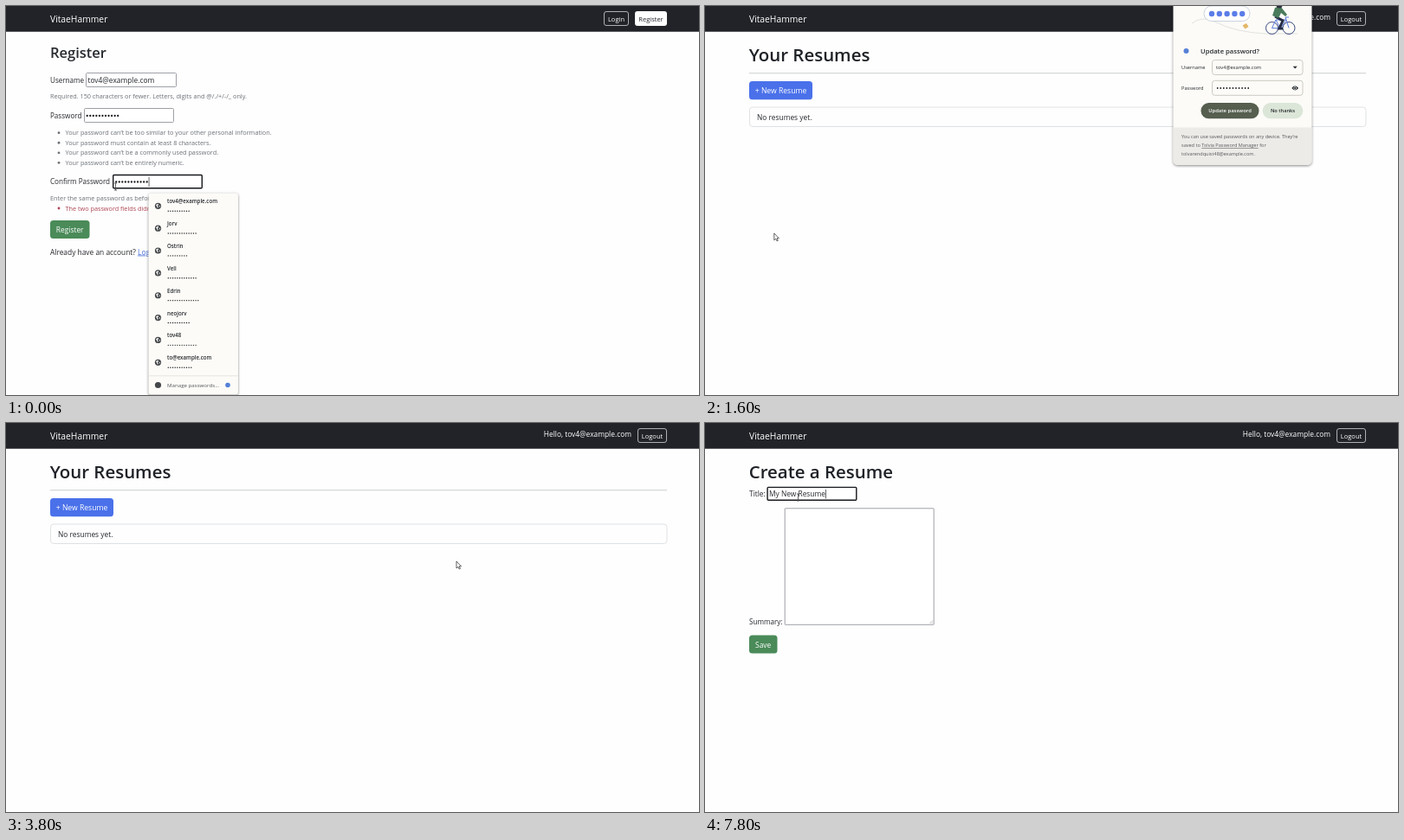
Recreate the animation shown at these times as an HTML page. Size 800 px wide and 450 px high, loop 8 s.

```html
<!DOCTYPE html>
<html lang="en">
<head>
<meta charset="utf-8">
<title>Resume builder</title>
<style>
html, body { margin: 0; width: 100%; height: 100%; overflow: hidden; background: #fefefe; }
svg { display: block; width: 800px; height: 450px; font: 8.39px "Open Sans", "Noto Sans", sans-serif; fill: #26292e; }
.h1 { font-size: 20.45px; font-weight: 600; fill: #1f2227; }
.brand { font-size: 10.3px; }
.label { font-size: 8.1px; }
.help { font-size: 7.28px; fill: #6b7077; }
.btn { font-size: 7.5px; }
.tiny { font-size: 5.7px; }
.bold { font-weight: 600; }
.light { fill: #fff; }
.mid { text-anchor: middle; }
.end { text-anchor: end; }
.error { fill: #ae4452; }
.link { fill: #4a6fd8; text-decoration: underline; }
.field { fill: #fff; stroke: #94969e; stroke-width: .9; }
.focus { stroke: #16181c; stroke-width: 1.4; }
.outline { fill: none; stroke: #d4d4d6; stroke-width: .8; }
.green { fill: #4a8b59; }
.green.hover { fill: #42734e; }
.blue { fill: #4a71ea; }
.blue.hover { fill: #3d60cb; }
.dots { fill: none; stroke: #1c1e22; stroke-linecap: round; stroke-width: 2.3; stroke-dasharray: 0 3.55; }
.panel { fill: #fcfbf7; filter: drop-shadow(0 1px 1.5px #0007); }
.box { fill: #fcfbf7; stroke: #cbcbc3; }
</style>
</head>
<body>
<svg viewBox="0 0 800 450">
  <defs>
    <g id="globe">
      <circle r="3.6" fill="#45484b"/>
      <path d="M-2.6-1.2 0-2.6.8-1.4-.6-.2.4 1-.6 2.6-1.2.8ZM1.4-.6 2.8 0 1.8 1.8Z" fill="#eee"/>
    </g>
  </defs>

  <path d="M0 0H800V29.7H0Z" fill="#212328"/>
  <text class="brand light" x="51" y="18.5">VitaeHammer</text>

  <g id="register">
    <rect class="outline" x="690.5" y="6.5" width="28" height="16" rx="2.5"/>
    <text class="btn light mid" x="704.5" y="17.6">Login</text>
    <rect class="light" x="726" y="6" width="37" height="17" rx="3"/>
    <text class="btn mid" x="744.5" y="17.6">Register</text>

    <text class="bold" font-size="16.5" x="51" y="60">Register</text>
    <text class="label" x="51" y="89">Username</text>
    <rect class="field" x="92.5" y="77.5" width="104" height="16" rx="1"/>
    <text x="94.5" y="89">tov4@example.com</text>
    <text class="help" x="51" y="107.3">Required. 150 characters or fewer. Letters, digits and @/./+/-/_ only.</text>
    <text class="label" x="51" y="130">Password</text>
    <rect class="field" x="90.5" y="118.5" width="103" height="16" rx="1"/>
    <path class="dots" d="M93.7 127h36"/>
    <g id="rules" class="help"></g>
    <text class="label" x="51" y="206.3">Confirm Password</text>
    <rect id="confirm" class="field" x="123.7" y="195.5" width="102.6" height="15.2" rx="1"/>
    <path class="dots" d="M127.2 203.5h36"/>
    <path id="confirmCaret" d="M164.7 198h.7v11h-.7Z"/>
    <text class="help" x="51" y="225">Enter the same password as before, for verification.</text>
    <g class="help error">
      <circle cx="61" cy="234" r="1.4"/>
      <text class="error" x="68.5" y="236.6">The two password fields didn’t match.</text>
    </g>
    <rect id="submit" class="green" x="51" y="248" width="45.5" height="21" rx="3.5"/>
    <text class="light mid" x="73.7" y="262">Register</text>
    <text x="51" y="287.5">Already have an account? <tspan class="link">Login here</tspan>.</text>
  </g>

  <g id="saved">
    <rect class="panel" x="164.5" y="216.5" width="103.5" height="233" rx="3"/>
    <g id="logins" font-size="6.15"></g>
    <path d="M164.5 427.5H268V428.3H164.5Z" fill="#dddcd6"/>
    <circle cx="175.5" cy="438.5" r="3.6" fill="#45484b"/>
    <text font-size="6.15" x="186" y="441" fill="#55585c">Manage passwords...</text>
    <circle cx="256" cy="438.5" r="2.8" fill="#5580d8"/>
  </g>

  <g id="account">
    <text class="light end" x="722" y="16.4">Hello, tov4@example.com</text>
    <rect class="outline" x="729.5" y="6.5" width="33" height="16" rx="2.5"/>
    <text class="btn light mid" x="746" y="17.5">Logout</text>
  </g>

  <g id="resumes">
    <text class="h1" x="50.7" y="64.3">Your Resumes</text>
    <path d="M51 77.2H763V78.2H51Z" fill="#cbccce"/>
    <rect id="add" class="blue" x="51" y="87" width="73" height="21.3" rx="3.5"/>
    <text class="light mid" x="87.5" y="101.2" font-size="8.6">+ New Resume</text>
    <rect x="51.5" y="117" width="711.5" height="22.5" rx="3.5" fill="none" stroke="#dfe2e6"/>
    <text x="60" y="131.6">No resumes yet.</text>
  </g>

  <g id="create">
    <text class="h1" x="50.7" y="64.3">Create a Resume</text>
    <text x="51" y="85.3">Title:</text>
    <rect id="title" class="field" x="72.1" y="74.4" width="102.7" height="14.9" rx="1"/>
    <text id="typed" x="74" y="85.3"></text>
    <path id="titleCaret" d="M0 77h.7v10.5h-.7Z"/>
    <text class="label" x="51" y="233.3">Summary:</text>
    <rect class="field" x="92.2" y="98.8" width="172" height="134.5" rx=".5"/>
    <path d="M259.5 232 263 228.5M261.7 232 263 230.7" stroke="#999" stroke-width=".6"/>
    <rect class="green" x="51" y="245.5" width="32.5" height="21" rx="3.5"/>
    <text class="light mid" x="67.2" y="259.6">Save</text>
  </g>

  <g id="popup">
    <rect class="panel" x="540.5" y="-20" width="160" height="204" rx="5"/>
    <path d="M540.5 140.5h160V179a5 5 0 0 1-5 5h-150a5 5 0 0 1-5-5Z" fill="#edebe8"/>
    <path d="M562 20Q574 11 588 18T616 28T646 32H684" fill="none" stroke="#d5d7d8" stroke-width=".7"/>
    <rect x="576" y="0" width="53" height="17.5" rx="8.7" fill="#fff" stroke="#cbd3df"/>
    <path d="M585 9h36" fill="none" stroke="#5b7de8" stroke-width="6.4" stroke-linecap="round" stroke-dasharray="0 8.8"/>
    <path d="M620.5 22.5 625 20 627.5 24 623.5 26.5Z" fill="#e3b668"/>
    <g fill="none" stroke="#39487e">
      <circle cx="654.5" cy="25.5" r="7"/>
      <circle cx="674" cy="25.5" r="7"/>
      <path d="M654.5 25.5 659 16H671L664 26ZM659 16 664 26M674 25.5 670 13H674" stroke="#587bdc"/>
      <path d="M658 12 667 17 663 26H667" stroke="#252c46" stroke-width="3"/>
    </g>
    <path d="M655 11 658 2 664 0 668 5 672 10 670 12 665 8 662 14Z" fill="#4a7b5b"/>
    <circle cx="663" cy="-1" r="3.5" fill="#2b2f3e"/>
    <circle cx="555.5" cy="52" r="3" fill="#5580d8"/>
    <text class="bold" font-size="7.65" x="572" y="54.8">Update password?</text>
    <g class="tiny">
      <text x="550" y="73">Username</text>
      <rect class="box" x="585.5" y="62.5" width="104.5" height="17" rx="3"/>
      <text x="590" y="73">tov4@example.com</text>
      <path d="M678.7 69.8h5l-2.5 2.6Z"/>
      <text x="550" y="97">Password</text>
      <rect class="box" x="585.5" y="86.3" width="104.5" height="17" rx="3"/>
      <path class="dots" d="M591.7 95h36" style="stroke-width:1.8"/>
      <path d="M677.3 95q3.9-4.8 7.8 0q-3.9 4.8-7.8 0Z"/>
      <circle cx="681.2" cy="95" r="1.5" fill="none" stroke="#fff" stroke-width=".7"/>
      <rect id="ring" x="571.3" y="110.8" width="69.4" height="20.7" rx="10.3" fill="none" stroke="#4c5546" stroke-width="1.3"/>
      <rect id="update" x="572.5" y="112" width="67" height="18.3" rx="9.1" fill="#555e4f"/>
      <text class="bold light mid" font-size="5.9" x="606" y="123.4">Update password</text>
      <rect x="643.7" y="112" width="46.5" height="18.3" rx="9.1" fill="#dbe6d8"/>
      <text class="bold mid" x="667" y="123.4">No thanks</text>
      <g fill="#55565a" font-size="5.55">
        <text x="550" y="153.3">You can use saved passwords on any device. They’re</text>
        <text x="550" y="163.3">saved to <tspan text-decoration="underline">Tolvia Password Manager</tspan> for</text>
        <text x="550" y="173.3">tolvarendquist48@example.com.</text>
      </g>
    </g>
  </g>

  <g id="status">
    <path d="M0 443H6Q8.5 443 8.5 445.5V450H0Z" fill="#dedfda"/>
    <text x="0" y="450.5" font-size="6.2" fill="#5c605c">s/</text>
  </g>

  <g id="arrow">
    <path d="M0 0V8L1.9 6.3 3.2 9 4.5 8.4 3.2 5.8H5.5Z" fill="#fff" stroke="#222" stroke-width=".7"/>
  </g>
  <g id="hand">
    <path d="M-.8.8Q0-.4.8.8V4L4 4.8Q4.8 5.2 4.6 7L3.8 10.8H-.3L-3 7.2Q-2.8 6-.8 7.2Z" fill="#fff" stroke="#222" stroke-width=".7"/>
  </g>
  <g id="beam">
    <path d="M-1.6-4H1.6M0-4V4M-1.6 4H1.6" fill="none" stroke="#444" stroke-width=".8"/>
  </g>
</svg>
<script>
const LOOP = 8000, STEP = 200;
const $ = id => document.getElementById(id);
const show = (id, on) => { $(id).style.display = on ? '' : 'none'; };

$('rules').innerHTML = [
  'Your password can’t be too similar to your other personal information.',
  'Your password must contain at least 8 characters.',
  'Your password can’t be a commonly used password.',
  'Your password can’t be entirely numeric.'
].map((rule, i) => {
  const y = 149.2 + 11.55 * i;
  return `<circle cx="61" cy="${y - 2.5}" r="1.4"/><text x="68.5" y="${y}">${rule}</text>`;
}).join('');

$('logins').innerHTML = [
  ['tov4@example.com', 10], ['Jorv', 13], ['Ostrin', 9], ['Vell', 13],
  ['Edrin', 14], ['neojorv', 10], ['tov48', 13], ['to@example.com', 11]
].map(([name, count], i) => `<g transform="translate(0 ${25.86 * i})">
  <use href="#globe" x="175.5" y="231.3"/>
  <text class="bold" x="186" y="228.3">${name}</text>
  <path class="dots" style="stroke-width:1.4;stroke-dasharray:0 2.65" d="M187.3 237.2h${2.65 * (count - 1) + .3}"/>
</g>`).join('');

// Pointer stops: time, x, y
const stops = [
  [0, 126.5, 209], [800, 79, 262.5], [1800, 80, 263], [2800, 600, 190],
  [3800, 520, 160], [4200, 78.5, 98.5], [4800, 78.5, 98.5], [5200, 102, 86],
  [6600, 102, 86], [6800, 107.5, 86], [LOOP, 107.5, 86]
];
const typing = [
  [6000, 'M'], [6200, 'My '], [6400, 'My N'], [6600, 'My Ne'], [6800, 'My New '],
  [7000, 'My New R'], [7200, 'My New Re'], [7600, 'My New Resu'], [7800, 'My New Resume']
];

function pointerAt(t) {
  const i = stops.findIndex(s => s[0] > t);
  const [t0, x0, y0] = stops[i - 1], [t1, x1, y1] = stops[i];
  const k = (t - t0) / (t1 - t0);
  return [x0 + (x1 - x0) * k, y0 + (y1 - y0) * k];
}

function pointerKind(t) {
  if (t < 200 || t >= 5200) return 'beam';
  if (t >= 2800 && t < 3800) return '';
  return (t >= 800 && t < 1400) || t === 4200 ? 'hand' : 'arrow';
}

function draw(t) {
  const page = t < 1400 ? 'register' : t < 4400 ? 'resumes' : 'create';
  for (const id of ['register', 'resumes', 'create']) show(id, id === page);
  show('account', page !== 'register');
  show('saved', t < 600);
  show('popup', t >= 1600 && t < 3800);
  show('ring', t >= 3000);
  $('update').setAttribute('fill', t >= 3000 ? '#4c5546' : '#555e4f');
  show('status', t >= 4200 && t < 5000);

  const confirming = t < 1000, titled = t >= 5400;
  $('confirm').classList.toggle('focus', confirming);
  show('confirmCaret', confirming);
  $('submit').classList.toggle('hover', t >= 800);
  $('add').classList.toggle('hover', t === 4200);
  $('title').classList.toggle('focus', titled);
  show('titleCaret', titled);

  const entry = typing.filter(([at]) => at <= t).pop();
  const typed = $('typed');
  typed.style.whiteSpace = 'pre';
  typed.textContent = entry ? entry[1] : '';
  const caretX = 74.2 + (entry ? typed.getComputedTextLength() : 0);
  $('titleCaret').setAttribute('transform', `translate(${caretX})`);

  const kind = pointerKind(t);
  for (const id of ['arrow', 'hand', 'beam']) show(id, id === kind);
  if (kind) $(kind).setAttribute('transform', `translate(${pointerAt(t)})`);
}

const start = performance.now();
function frame() {
  const t = (performance.now() - start) % LOOP;
  draw(Math.floor(t / STEP) * STEP);
  requestAnimationFrame(frame);
}
frame();
</script>
</body>
</html>
```
